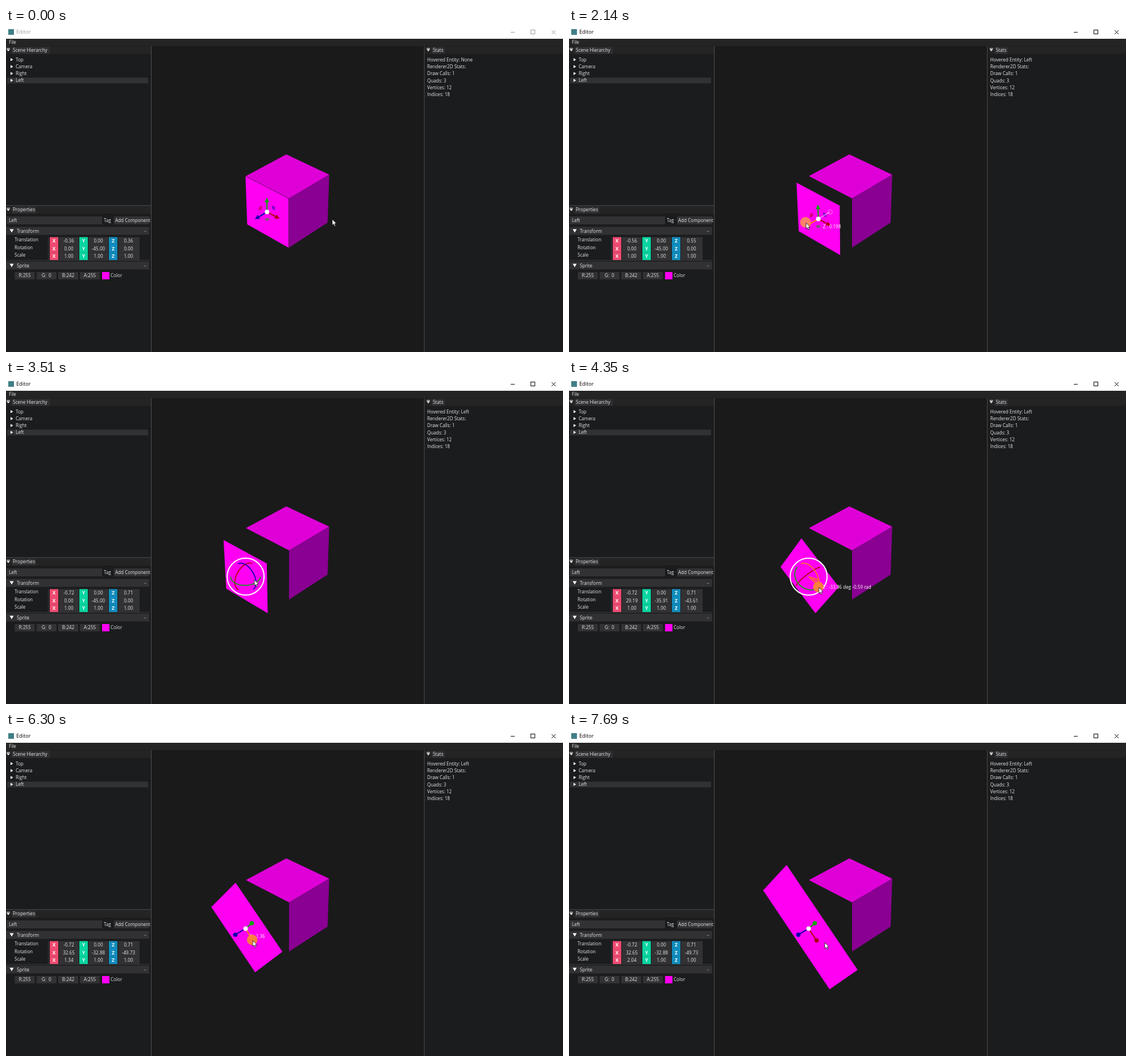
Animation of 980x571 px, one loop 8150 ms. Source, as an HTML page with a canvas:

```html
<!DOCTYPE html>
<html lang="en">
<head>
<meta charset="utf-8">
<title>Editor</title>
<style>
html, body { margin: 0; width: 100%; height: 100%; overflow: hidden; background: #1a1a1a; }
canvas { display: block; }
</style>
</head>
<body>
<canvas id="stage" width="980" height="571"></canvas>
<script>
const g = document.getElementById('stage').getContext('2d');
const LOOP = 8150, DEG = Math.PI / 180, H = Math.SQRT1_2;
const PINK = '#ff00f2', ORANGE = '#ff8010', AXES = ['#aa0000', '#00aa00', '#0000aa'];

// Moments when the state changes
const GRAB = 1370, DROP = 2670, ROTATE = 2910, TWIST = 3690, UNTWIST = 4900,
      SCALE = 5220, PULL = 5860, LET_GO = 7140;

const moveKeys = [[1370, 0], [1520, .009], [1600, .009], [2140, .198], [2210, .198], [2510, .358]];
const turnKeys = [[3830, 0], [4350, 33.96], [4450, 33.96], [4670, 38.6], [4900, 39.85]];
const scaleKeys = [[5820, 1], [6300, 1.36], [6610, 1.75], [6910, 2.04]];
const approachKeys = [[190, 574, 337], [280, 586, 358], [400, 586, 358], [740, 480, 346],
  [900, 397, 331], [1060, 441, 334], [1220, 442, 334]];
const toRingKeys = [[2850, 397, 351], [3350, 434, 346], [3510, 437, 352], [3690, 438, 352]];
const toHandleKeys = [[5180, 439, 368], [5690, 431, 362]];
const leaveKeys = [[7080, 441, 377], [7300, 452, 375], [7490, 452, 375], [7690, 450, 371]];

function at(keys, t) {
  const last = keys[keys.length - 1];
  if (t >= last[0]) return last.slice(1);
  const i = Math.max(1, keys.findIndex(k => k[0] > t));
  const [a, b] = [keys[i - 1], keys[i]];
  const u = Math.max(0, (t - a[0]) / (b[0] - a[0]));
  return a.slice(1).map((v, j) => v + (b[j + 1] - v) * u);
}

// Camera: slight yaw, looking down
const YAW_S = .033, YAW_C = .9995, PITCH_S = .554, PITCH_C = .8325, DIST = 13.5, FOCAL = 1372;
function near([x, y, z]) {
  return y * PITCH_S + (z * YAW_C - x * YAW_S) * PITCH_C;
}
function project(p) {
  const [x, y, z] = p, k = FOCAL / (DIST - near(p));
  const zr = z * YAW_C - x * YAW_S;
  return [495.5 + k * (x * YAW_C + z * YAW_S), 303 - k * (y * PITCH_C - zr * PITCH_S)];
}
// Origin plus a weighted sum of axes
function offset(o, axes, weights) {
  return o.map((v, i) => v + axes.reduce((s, a, j) => s + a[i] * weights[j], 0));
}

function rect(x, y, w, h, color) {
  g.fillStyle = color;
  g.fillRect(x, y, w, h);
}
function text(s, x, y, color = '#e6e6e6', size = 8.1, align = 'left', weight = '') {
  g.font = `${weight} ${size}px "Open Sans", sans-serif`;
  g.textAlign = align;
  g.fillStyle = color;
  g.fillText(s, x, y);
}
function path(points, closed) {
  g.beginPath();
  points.forEach(p => g.lineTo(...p));
  if (closed) g.closePath();
}
function fill(points, color) {
  path(points, true);
  g.fillStyle = color;
  g.fill();
}
function stroke(points, color, width = 1) {
  path(points);
  g.strokeStyle = color;
  g.lineWidth = width;
  g.stroke();
}
function dot([x, y], r, color) {
  g.beginPath();
  g.arc(x, y, r, 0, 7);
  g.fillStyle = color;
  g.fill();
}
function ring([x, y], r, color, width) {
  g.beginPath();
  g.arc(x, y, r, 0, 7);
  g.strokeStyle = color;
  g.lineWidth = width;
  g.stroke();
}
function downArrow(x, y) {
  fill([[x - 3.5, y - 2.5], [x + 3.5, y - 2.5], [x, y + 3.5]], '#fff');
}

function titleBar(active) {
  const ink = active ? '#000' : '#999';
  rect(0, 0, 980, 19, '#fff');
  rect(4, 2, 10, 10, '#3f7f86');
  text('Editor', 18, 8, ink, 9.2);
  stroke([[888, 7.5], [895, 7.5]], ink);
  g.strokeRect(923.5, 3.5, 7, 7);
  stroke([[960, 4], [967, 11]], ink);
  stroke([[967, 4], [960, 11]], ink);
}

function panel(x, y, w, label, labelWidth) {
  rect(x, y, w, 13, '#242425');
  rect(x + 10, y + 1, labelWidth, 12, '#303032');
  rect(x + 1, y + 3, 6, 1, '#fff');
  fill([[x + 1, y + 5], [x + 7, y + 5], [x + 4, y + 8.5]], '#fff');
  text(label, x + 12, y + 7);
}

function sidePanels(t, state) {
  rect(0, 19, 980, 13, '#242425');
  text('File', 5, 26.3);
  rect(0, 32, 255, 539, '#1b1c1d');
  rect(737, 32, 243, 539, '#1b1c1d');
  rect(255, 32, 1, 539, '#505052');
  rect(735.5, 32, 1, 539, '#505052');
  panel(0, 32.5, 255, 'Scene Hierarchy', 67);
  panel(0, 314, 255, 'Properties', 43);
  panel(739, 32.5, 241, 'Stats', 23);
  rect(0, 312.5, 255, 1, '#505052');

  rect(2, 87.5, 248, 10, '#323234');
  ['Top', 'Camera', 'Right', 'Left'].forEach((name, i) => {
    const y = 56.6 + i * 12.2;
    fill([[8, y - 3.6], [8, y + 1.9], [12.5, y - .9]], '#fff');
    text(name, 17, y);
  });
  ['Hovered Entity: ' + (t < GRAB ? 'None' : 'Left'), 'Renderer2D Stats:', 'Draw Calls: 1',
    'Quads: 3', 'Vertices: 12', 'Indices: 18'].forEach((s, i) => text(s, 741, 56.7 + i * 12.3));

  rect(1, 332, 168, 14, '#323234');
  text('Left', 5, 339.7);
  text('Tag', 172, 339.7);
  rect(190, 332, 62, 14, '#323234');
  text('Add Component', 192, 339.7);
  [['Transform', 350.5], ['Sprite', 411.5]].forEach(([name, y]) => {
    rect(0, y, 252, 14, '#313133');
    downArrow(10, y + 6.5);
    text(name, 19, y + 8);
    text('..', 242.5, y + 6.5);
  });

  rect(74, 368, 1, 41, '#3a3a3d');
  rect(0, 409, 252, 1, '#3a3a3d');
  state.forEach(([name, ...values], row) => {
    const y = 376.2 + row * 13.4;
    text(name, 15, 374.2 + row * 13.4);
    values.forEach((v, i) => {
      const x = [77, 129, 181][i];
      rect(x, y - 7.7, 15, 13.6, ['#ed4a70', '#0ad4a0', '#118cbc'][i]);
      text('XYZ'[i], x + 7.5, y, '#fff', 8.1, 'center', 'bold');
      rect(x + 16, y - 7.7, i < 2 ? 35 : 38, 13.4, '#323234');
      text(v.toFixed(2), x + (i < 2 ? 33.5 : 34.5), y, '#e6e6e6', 8.1, 'center');
    });
  });

  ['R:255', 'G:  0', 'B:242', 'A:255'].forEach((s, i) => {
    rect(15.5 + i * 38.2, 430, 35, 13, '#323234');
    text(s, 33 + i * 38.2, 437, '#e6e6e6', 8.1, 'center');
  });
  rect(169, 430, 13, 13, PINK);
  text('Color', 184, 437);
}

function moveGizmo(pos, axes, dragging, start) {
  const c = project(pos);
  [[1, 2], [0, 2], [0, 1]].forEach(([a, b], i) => {
    const corner = (u, v) => project(offset(pos, [axes[a], axes[b]], [u, v]));
    g.globalAlpha = .5;
    fill([corner(.12, .12), corner(.19, .12), corner(.19, .19), corner(.12, .19)], AXES[i]);
    g.globalAlpha = 1;
  });
  axes.forEach((axis, i) => {
    const tip = project(offset(pos, [axis], [.29]));
    const dx = tip[0] - c[0], dy = tip[1] - c[1], len = Math.hypot(dx, dy);
    const [ux, uy] = [dx / len, dy / len];
    const base = [tip[0] - ux * 8, tip[1] - uy * 8];
    const color = dragging && i == 2 ? ORANGE : AXES[i];
    stroke([c, base], color, 2);
    fill([tip, [base[0] - uy * 4, base[1] + ux * 4], [base[0] + uy * 4, base[1] - ux * 4]], color);
  });
  if (dragging) {
    const from = project(start);
    stroke([from, c], 'rgba(255,225,255,.65)', 1.5);
    ring(from, 4, 'rgba(255,225,255,.55)', 1);
  }
  dot(c, 4, '#fff');
}

function rotateGizmo(pos, axes, flat, turn, twisting, hover) {
  const R = .245, c = project(pos);
  [[1, 2], [2, 0], [0, 1]].forEach(([a, b], i) => {
    const pair = [axes[a], axes[b]];
    // Only the half that faces the camera
    const mid = Math.atan2(near(pair[1]), near(pair[0]));
    const points = Array.from({ length: 33 }, (_, k) => {
      const w = mid + (k / 32 - .5) * Math.PI;
      return project(offset(pos, pair, [R * Math.cos(w), R * Math.sin(w)]));
    });
    stroke(points, i == 2 && hover ? ORANGE : AXES[i], 1.6);
  });
  if (twisting) {
    const arc = Array.from({ length: 17 }, (_, k) => {
      const w = (14 - turn * k / 16) * DEG;
      return project(offset(pos, flat, [R * Math.cos(w), R * Math.sin(w)]));
    });
    fill([c, ...arc], 'rgba(255,128,16,.5)');
    stroke([c, ...arc, c], ORANGE, 1.2);
  }
  ring(c, 32.5, '#fff', 2);
}

function scaleGizmo(pos, axes, hover, grab) {
  const c = project(pos);
  axes.forEach((axis, i) => {
    const end = grab && i == 0 ? grab : project(offset(pos, [axis], [.235]));
    const color = hover && i == 0 ? ORANGE : AXES[i];
    stroke([c, end], color, 2);
    dot(end, 3.8, color);
  });
  dot(c, 4, '#fff');
}

function pointer([x, y], pressed, warm) {
  if (pressed) dot([x - 1, y - 1], 9.3, warm ? 'rgba(251,133,56,.95)' : 'rgba(250,136,98,.95)');
  const shape = [[0, 0], [0, 10.5], [2.4, 8.4], [4, 12.3], [5.8, 11.5], [4.2, 7.8], [7.3, 7.6]]
    .map(([a, b]) => [x + a, y + b]);
  fill(shape, '#fff');
  stroke([...shape, shape[0]], '#111', .8);
}

function draw(t) {
  const during = (a, b) => t >= a && t < b;
  const [move] = at(moveKeys, t), [turn] = at(turnKeys, t);
  const [scale] = at(scaleKeys, t - 22), [pull] = at(scaleKeys, t);
  const s = Math.sin(turn * DEG), c = Math.cos(turn * DEG);
  const start = [-.36, 0, .3561], pos = [start[0] - move, 0, start[2] + move];
  const flat = [[H, 0, H], [0, 1, 0]];
  const axes = [[H * c, -s, H * c], [H * s, c, H * s], [-H, 0, H]];

  rect(0, 0, 980, 571, '#1a1a1a');
  titleBar(t >= GRAB);
  sidePanels(t, [
    ['Translation', ...pos],
    ['Rotation', Math.atan(s) / DEG, -Math.asin(H * c) / DEG, Math.atan2(-s, H * c) / DEG],
    ['Scale', scale, 1, 1]
  ]);

  const face = (points, color) => fill(points.map(project), color);
  face([[0, .5, -H], [H, .5, 0], [0, .5, H], [-H, .5, 0]], '#df00d8');
  face([[0, .5, H], [H, .5, 0], [H, -.5, 0], [0, -.5, H]], '#8a0092');
  face([[-1, 1], [1, 1], [1, -1], [-1, -1]]
    .map(([x, y]) => offset(pos, axes, [x * scale / 2, y / 2, 0])), PINK);

  const dragging = during(GRAB, DROP), twisting = during(TWIST, UNTWIST), pulling = during(PULL, LET_GO);
  const grip = [420.5 + 10 * pull, 347 + 14.9 * pull];

  let cursor;
  if (t < GRAB) cursor = at(approachKeys, t);
  else if (t < 2850) cursor = [442 - 126 * move, 334 + 47 * move];
  else if (t < TWIST) cursor = at(toRingKeys, t);
  else if (t < 5180) {
    const w = (14 - turn) * DEG;
    const p = project(offset(pos, flat, [.245 * Math.cos(w), .245 * Math.sin(w)]));
    cursor = [p[0] + .5, p[1] + 2];
  }
  else if (t < PULL) cursor = at(toHandleKeys, t);
  else if (t < 7080) cursor = grip;
  else cursor = at(leaveKeys, t);

  if (t < ROTATE) moveGizmo(pos, axes, dragging, start);
  else if (t < SCALE) rotateGizmo(pos, axes, flat, turn, twisting, during(3560, UNTWIST));
  else scaleGizmo(pos, axes, during(5620, LET_GO), pulling && grip);

  const [x, y] = project(pos);
  if (dragging) text(`Z : ${move.toFixed(3)}`, x + 8, y + 14.5, '#fff');
  if (twisting) text(`Z : ${(-turn).toFixed(2)} deg ${(-turn * DEG).toFixed(2)} rad`, 446, 366, '#fff');
  if (pulling) text(`X : ${pull.toFixed(2)}`, x + 7, y + 14.5, '#fff');
  pointer(cursor, dragging || twisting || pulling, t > ROTATE);
}

g.textBaseline = 'middle';
function tick(now) {
  draw(now % LOOP);
  requestAnimationFrame(tick);
}
draw(0);
requestAnimationFrame(tick);
</script>
</body>
</html>
```
